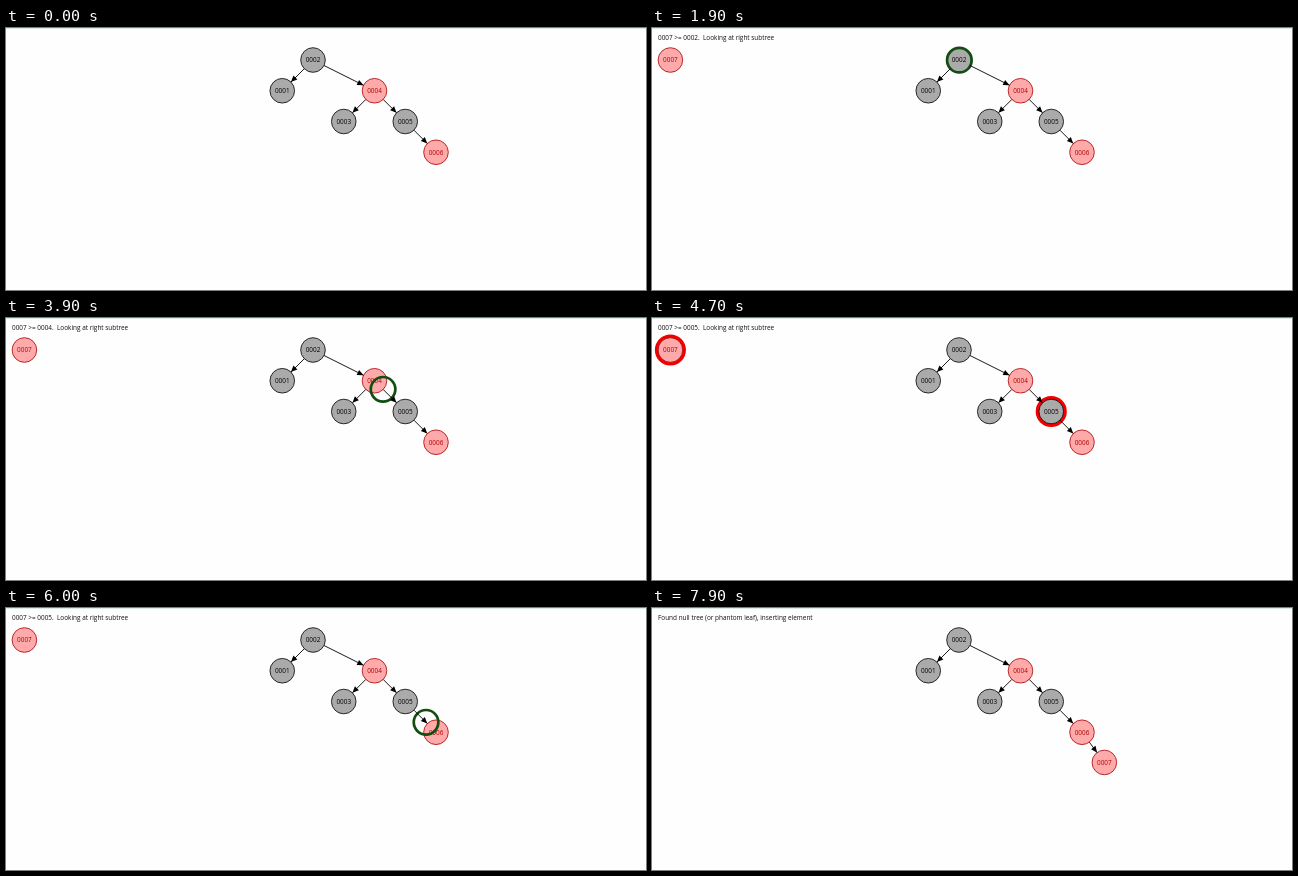
Write an HTML page that moves like this. It is 640x262 px and loops after 8 s.

```html
<!DOCTYPE html>
<html lang="en">
<head>
<meta charset="utf-8">
<title>Red-black tree insertion</title>
<style>
  html, body { margin: 0; width: 100%; height: 100%; overflow: hidden; background: #fefefe; }
  svg { display: block; width: 640px; height: 262px; }
  text { font: 6.42px "Open Sans", "Noto Sans", sans-serif; white-space: pre; fill: #111; }
  .node { --ink: #000; }
  .node.red { --ink: #a00; }
  .node text { text-anchor: middle; fill: var(--ink); }
  .disc { fill: #aaa; stroke: var(--ink); stroke-width: .8; }
  .red .disc { fill: #faa; }
  .glow { fill: #f00000; }
  .edge line { stroke: #000; stroke-width: .9; }
  #cursor { fill: none; stroke: #124d12; stroke-width: 2.7; }
</style>
</head>
<body>
<svg viewBox="0 0 640 262">
  <rect width="640" height="1" fill="#d9ebe3"/>
  <text id="caption" x="6" y="12.3"></text>
  <g id="nodes"></g>
  <circle id="cursor" r="12.3"/>
  <g id="edges"></g>
</svg>
<script>
const LOOP = 8000, TICK = 100, R = 12.3, STEP = 30.75;
const HOME = { x: 18.4, y: 32 };

// Tree nodes on a grid of columns and rows around the root
const at = (col, row) => ({ x: 307 + col * STEP, y: 32 + row * STEP });
const pos = { 1: at(-1, 1), 2: at(0, 0), 3: at(1, 2), 4: at(2, 1), 5: at(3, 2), 6: at(4, 3), 7: { ...HOME } };
const reds = [4, 6, 7];
const links = [[2, 1], [2, 4], [4, 3], [4, 5], [5, 6], [6, 7]];

// Compare and descend phases alternate along the path; the last phase inserts
const path = [2, 4, 5, 6];
const starts = [1025, 1895, 2775, 3655, 4535, 5415, 6280, 7110];
const INSERT = 7, INSERT_MS = 870, INSERT_STEPS = 30;

const byId = id => document.getElementById(id);
const lerp = (a, b, p) => a + (b - a) * p;

function add(parent, tag, attrs = {}, text = "") {
  const el = document.createElementNS("http://www.w3.org/2000/svg", tag);
  set(el, attrs);
  el.textContent = text;
  return parent.appendChild(el);
}
function set(el, attrs) {
  for (const name in attrs) el.setAttribute(name, attrs[name]);
}
const show = (el, on) => set(el, { visibility: on ? "visible" : "hidden" });
const place = (el, p) => set(el, { transform: `translate(${p.x} ${p.y})` });
const label = key => "000" + key;

const nodes = {};
for (const key of Object.keys(pos)) {
  const group = add(byId("nodes"), "g", { class: reds.includes(+key) ? "node red" : "node" });
  const glow = add(group, "circle", { class: "glow", r: 0 });
  add(group, "circle", { class: "disc", r: R });
  add(group, "text", { y: 2.3 }, label(key));
  place(group, pos[key]);
  nodes[key] = { group, glow };
}

const edges = links.map(([from, to]) => {
  const group = add(byId("edges"), "g", { class: "edge" });
  const line = add(group, "line");
  add(group, "path", { d: "M0 0L-6.3 -2.8V2.8Z" });
  return { from, to, group, line, head: group.lastChild };
});

function drawEdge({ from, to, line, head }) {
  const a = pos[from], b = pos[to];
  const angle = Math.atan2(b.y - a.y, b.x - a.x);
  const dx = R * Math.cos(angle), dy = R * Math.sin(angle);
  set(line, { x1: a.x + dx, y1: a.y + dy, x2: b.x - dx, y2: b.y - dy });
  set(head, { transform: `translate(${b.x - dx} ${b.y - dy}) rotate(${angle * 180 / Math.PI})` });
}

// Two moves run at once, each pulling the node towards its own target
function insertPos(ms) {
  const done = Math.min(INSERT_STEPS, Math.ceil(ms / INSERT_MS * INSERT_STEPS));
  const targets = [at(4.5, 4), at(5, 4)];
  let { x, y } = HOME;
  for (let k = 0; k < done; k++) {
    const p = 1 / (INSERT_STEPS - k);
    for (const goal of targets) {
      x = lerp(x, goal.x, p);
      y = lerp(y, goal.y, p);
    }
  }
  return { x, y };
}

// Triangle wave for the width of the red rings
function pulse(t) {
  const period = 412, peak = 280;
  const d = (t - peak + 10 * period) % period;
  return 1.85 + 3.07 * Math.abs(1 - 2 * d / period);
}

function captionFor(t, phase) {
  if (t < TICK) return "";
  if (phase < 0) return "Inserting 0007";
  if (phase === INSERT) return "Found null tree (or phantom leaf), inserting element";
  return `0007 >= ${label(path[phase >> 1])}.  Looking at right subtree`;
}

function render(t) {
  const phase = starts.filter(s => s <= t).length - 1;
  const inserting = phase === INSERT;
  const comparing = phase >= 0 && phase % 2 === 0;
  const descending = phase > 0 && phase % 2 === 1 && !inserting;
  const current = path[phase >> 1];

  byId("caption").textContent = captionFor(t, phase);

  for (const key in nodes) {
    const lit = comparing && (+key === current || +key === 7);
    set(nodes[key].glow, { r: lit ? R + pulse(t) : 0 });
  }

  show(nodes[7].group, t >= TICK);
  pos[7] = inserting ? insertPos(t - starts[INSERT]) : HOME;
  place(nodes[7].group, pos[7]);

  const cursor = byId("cursor");
  show(cursor, descending);
  if (descending) {
    const a = pos[current], b = pos[path[(phase + 1) >> 1]];
    const p = (t - starts[phase]) / (starts[phase + 1] - starts[phase]);
    place(cursor, { x: lerp(a.x, b.x, p), y: lerp(a.y, b.y, p) });
  }

  for (const edge of edges) {
    show(edge.group, edge.to !== 7 || inserting);
    drawEdge(edge);
  }
}

const begin = performance.now();
function frame() {
  const t = (performance.now() - begin) % LOOP;
  render(Math.floor(t / TICK) * TICK);
  requestAnimationFrame(frame);
}
frame();
</script>
</body>
</html>
```
